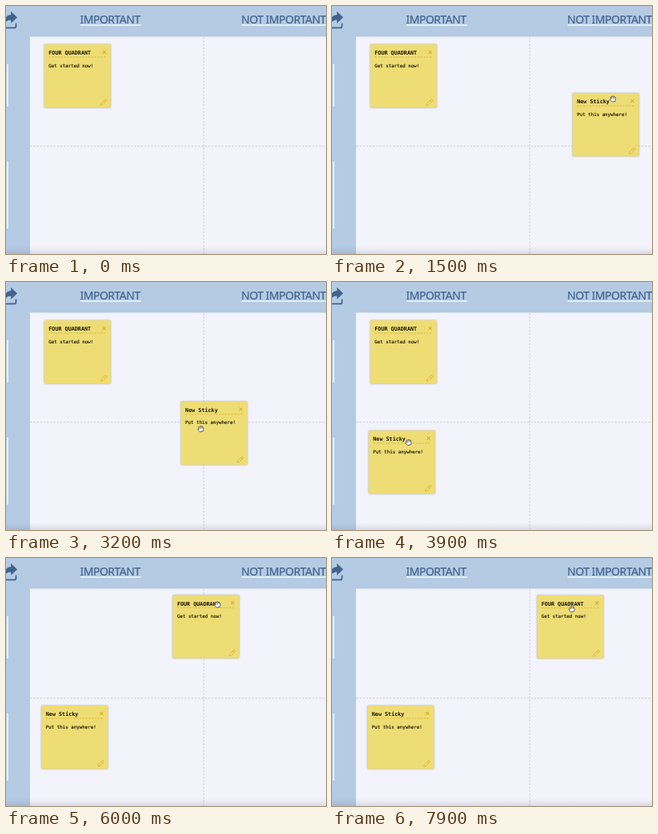
Write an HTML page that moves like this. It is 400 px wide and 311 px high and loops after 8000 ms.

```html
<!DOCTYPE html>
<html lang="en">
<head>
<meta charset="utf-8">
<title>Sticky note board</title>
<style>
  html, body { margin: 0; width: 100%; height: 100%; overflow: hidden; background: #b4cbe3; }
  svg { display: block; width: 400px; height: 311px; }
  .head { font: 14px "Noto Sans", sans-serif; letter-spacing: -.5px; fill: #426390; stroke: #426390; stroke-width: .2; }
  .title { font: bold 6.75px "DejaVu Sans Mono", monospace; fill: #16130a; }
  .body { font: 5.8px "DejaVu Sans Mono", monospace; fill: #16130a; stroke: #16130a; stroke-width: .15; }
  .note { filter: drop-shadow(0 .8px 1.2px rgba(60, 60, 80, .42)); }
  .ink { fill: none; stroke: #dbb02f; }
</style>
</head>
<body>
<svg viewBox="0 0 400 311">
  <defs>
    <linearGradient id="shade" x2="0" y2="1">
      <stop offset="0" stop-color="#70738a" stop-opacity="0"/>
      <stop offset="1" stop-color="#70738a" stop-opacity=".2"/>
    </linearGradient>
    <g id="sheet">
      <rect class="note" x=".3" width="83" height="79.4" rx=".8" fill="#eedd74"/>
      <path class="ink" d="M6 16H78" stroke-width=".8" stroke-dasharray="2.4 1.4"/>
      <path class="ink" d="M73.2 7.8l4 4m0-4l-4 4" stroke-width="1.1"/>
      <path class="ink" d="M70.8 76.4l.7-2.5 4.7-4.7q.9-.6 1.7.2t.1 1.7l-4.7 4.7zM75 70.3l1.9 1.9" stroke-width=".8"/>
    </g>
  </defs>

  <rect width="400" height="311" fill="#b4cbe3"/>
  <rect x="30" y="38.5" width="370" height="272.5" fill="#f3f4fb"/>
  <path d="M247.2 39V311M30 175.8H400" fill="none" stroke="#cbccdd" stroke-dasharray="2.6 1.6"/>
  <path d="M93 24H169M294.5 24H400M2 73V126M2 195V279" fill="none" stroke="#f4f7fb" stroke-width="1.7"/>
  <text class="head" x="92.5" y="22.3">IMPORTANT</text>
  <text class="head" x="294" y="22.3">NOT IMPORTANT</text>
  <path d="M14 14.3L6.2 6.8V11Q0 11.2 -2 18V22Q1 17.6 6.2 17.6V21.8Z" fill="#426390"/>
  <path d="M-1 27.4H10.5Q12.5 27.4 12.5 25.4V21.5" fill="none" stroke="#426390" stroke-width="1.7"/>

  <g id="first">
    <use href="#sheet"/>
    <text class="title" x="5.8" y="13.2">FOUR QUADRANT</text>
    <text class="body" x="5.8" y="28.6">Get started now!</text>
  </g>
  <g id="second">
    <use href="#sheet"/>
    <text class="title" x="5.8" y="13.2">New Sticky</text>
    <text class="body" x="5.8" y="28.6">Put this anywhere!</text>
  </g>
  <rect y="302" width="400" height="9" fill="url(#shade)"/>
  <g id="hand" stroke="#35343a" stroke-width=".8" stroke-linejoin="round" stroke-linecap="round">
    <g transform="rotate(-12) scale(.92)">
      <path d="M-2.6 -1.6Q-2.6 -3.3 -1.1 -3Q-.4 -4.2 .6 -3.2Q1.7 -3.8 2.2 -2.6Q3.7 -2.8 3.7 -1.2V1Q3.5 2.4 2.6 3.9H-1.7Q-3.8 1.4 -3.8 -.2Q-3.6 -1 -2.6 -.4Z" fill="#fff"/>
      <path d="M-1 -2.6V-.4M.7 -2.8V-.4M2.3 -2.3V-.4" fill="none" stroke-width=".6"/>
    </g>
  </g>
</svg>
<script>
const LOOP = 8000, STEP = 100;
const linear = k => k;
const smooth = k => k * k * (3 - 2 * k);
const fling = k => 1 - (1 - k) ** 3;

// An eased move to a point, optionally curving towards a bend.
const move = (start, end, ease, to, bend) => ({ start, end, ease, to, bend });

const actors = {
  first: {
    home: [47.5, 48],
    moves: [
      move(5600, 6500, fling, [249, 49], [126, 40]),
      move(6500, 7100, smooth, [256, 46.7])
    ]
  },
  second: {
    home: [405, 196],
    moves: [
      move(400, 800, linear, [370, 164]),
      move(1200, 2400, fling, [264, 52.5], [300, 128]),
      move(2700, 3800, smooth, [45.5, 186.2], [254, 200]),
      move(3900, 4300, smooth, [44, 185])
    ]
  },
  hand: {
    home: [455, 210],
    moves: [
      move(400, 800, linear, [420, 178]),
      move(1200, 2400, fling, [314, 68], [351, 127]),
      move(2700, 3800, smooth, [95.5, 201], [253, 254]),
      move(4700, 5000, smooth, [113, 59]),
      move(5100, 5500, smooth, [104.5, 57]),
      move(5600, 6500, fling, [305, 58], [182, 59]),
      move(6500, 7100, smooth, [310.5, 58]),
      move(7200, 7900, smooth, [299.5, 64])
    ]
  }
};

function place({ home, moves }, t) {
  let from = home;
  for (const { start, end, ease, to, bend } of moves) {
    if (t < start) break;
    const s = ease(Math.min(1, (t - start) / (end - start)));
    from = from.map((a, i) => {
      const mid = bend ? bend[i] : (a + to[i]) / 2;
      return (1 - s) ** 2 * a + 2 * s * (1 - s) * mid + s * s * to[i];
    });
  }
  return from;
}

function draw() {
  const t = Math.floor(performance.now() % LOOP / STEP) * STEP;
  for (const id in actors) {
    const [x, y] = place(actors[id], t);
    document.getElementById(id).setAttribute("transform", `translate(${x} ${y})`);
  }
  requestAnimationFrame(draw);
}
draw();
</script>
</body>
</html>
```
